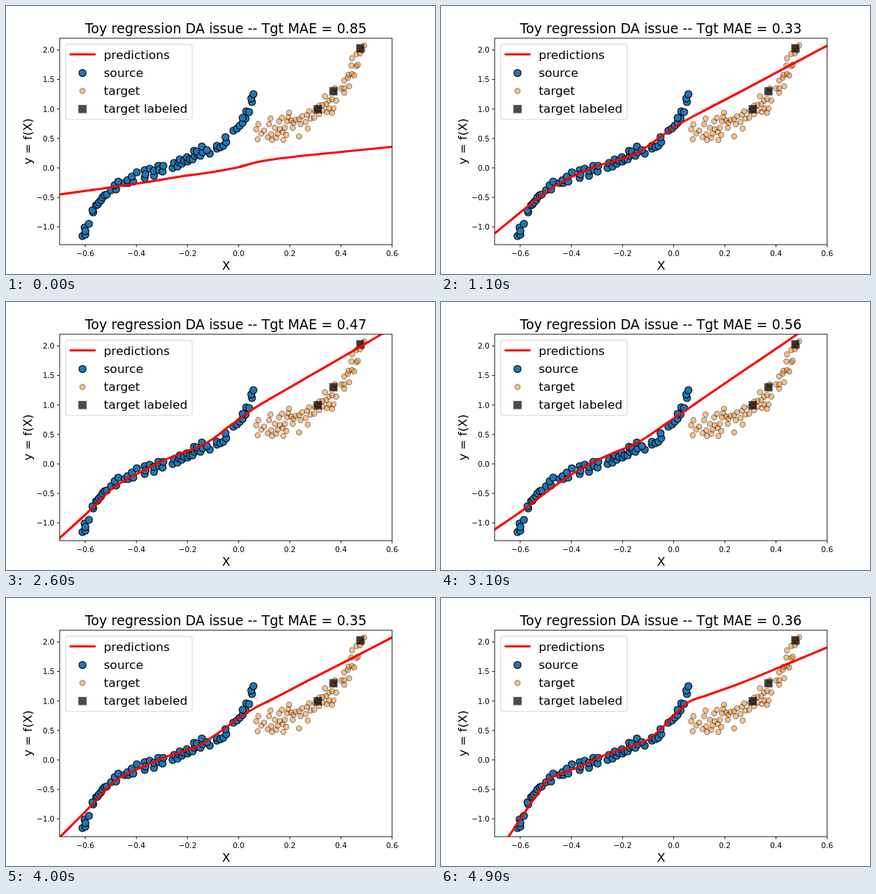
Recreate the animation shown at these times as an HTML page. Size 600x374 px, loop 5 s.

```html
<!DOCTYPE html>
<html lang="en">
<head>
<meta charset="utf-8">
<title>Toy regression</title>
<style>
html, body { margin: 0; width: 100%; height: 100%; overflow: hidden; background: #fff; }
svg { display: block; width: 600px; height: 374px; font-family: "DejaVu Sans", sans-serif; }
text { text-anchor: middle; }
.big { font-size: 16.67px; }
.tick { font-size: 10.42px; }
.legend { text-anchor: start; }
.axis { fill: none; stroke: #000; stroke-width: .9; }
.source { fill: #1f77b4; stroke: #000; stroke-width: 1.1; }
.target { fill: #ff7f0e; stroke: #000; stroke-width: 1.04; opacity: .5; }
.labeled { stroke: #000; opacity: .7; }
.fit { fill: none; stroke: #f00; stroke-width: 3.13; stroke-linecap: square; stroke-linejoin: round; }
</style>
</head>
<body>
<svg id="plot" viewBox="0 0 600 374">
  <clipPath id="area"><rect x="75" y="45" width="465" height="288"/></clipPath>
</svg>
<script>
const svg = document.getElementById('plot');

function add(tag, attrs, text) {
  const el = document.createElementNS('http://www.w3.org/2000/svg', tag);
  for (const k in attrs) el.setAttribute(k, attrs[k]);
  if (text) el.textContent = text;
  return svg.appendChild(el);
}
const label = (x, y, cls, text, more) => add('text', { x, y, class: cls, ...more }, text);
const dot = (cx, cy, cls) => add('circle', { cx, cy, r: cls === 'source' ? 5 : 3.65, class: cls });
const square = (x, y) => add('rect', { x: x - 5.2, y: y - 5.2, width: 10.4, height: 10.4, class: 'labeled' });
const number = v => v.toFixed(1).replace('-', '\u2212');

function scatter(list, cls) {
  for (let i = 0; i < list.length; i += 2) dot(list[i], list[i + 1], cls);
}

const source = [
  107,321, 111,319, 110,309, 111,314, 116,304, 122,288, 121,285, 126,278, 128,277,
  130,274, 133,271, 135,267, 138,264, 141,263, 147,257, 154,256, 152,250, 157,245,
  166,247, 171,247, 170,243, 178,245, 176,238, 183,232, 194,240, 194,229, 195,235,
  201,227, 207,237, 207,230, 213,223, 214,229, 219,231, 220,223, 233,226, 235,219,
  240,224, 242,218, 246,220, 243,214, 249,216, 254,217, 253,211, 257,214, 261,214,
  264,209, 263,202, 268,207, 267,203, 272,209, 275,204, 274,196, 285,206, 281,201,
  295,199, 295,195, 300,197, 304,195, 308,190, 307,183, 318,174, 323,171, 327,167,
  331,163, 335,157, 331,156, 336,147, 340,148, 344,134, 343,129, 346,123
];
const target = [
  352,186, 353,165, 350,172, 357,178, 361,174, 366,183, 368,165, 370,157, 371,179,
  372,187, 376,170, 378,184, 380,178, 382,161, 383,172, 386,156, 387,176, 388,187,
  390,170, 393,161, 392,180, 396,149, 395,155, 399,160, 401,170, 402,163, 405,159,
  410,158, 410,182, 412,165, 414,154, 419,162, 421,152, 422,171, 424,147, 426,157,
  431,156, 432,147, 436,144, 438,151, 438,139, 443,146, 443,138, 446,126, 448,137,
  449,148, 452,143, 452,132, 456,130, 458,143, 456,149, 458,120, 462,132, 460,115,
  469,115, 473,121, 473,104, 473,115, 478,100, 480,112, 479,96, 484,95, 483,83,
  484,73, 487,97, 490,84, 492,82, 490,67, 495,66, 495,59, 498,62, 501,55
];

scatter(source, 'source');
scatter(target, 'target');
[[436, 144], [458, 119], [495.5, 59]].forEach(p => square(...p));

const fit = add('path', { class: 'fit', 'clip-path': 'url(#area)' });

// Axes
add('rect', { x: 75, y: 45, width: 465, height: 288, class: 'axis' });
for (let i = 0; i < 7; i++) {
  const x = 110.8 + i * 71.54;
  add('path', { d: `M${x} 333v3.6`, class: 'axis' });
  label(x, 348.6, 'tick', number((i - 3) / 5));
  const y = 308.2 - i * 41.13;
  add('path', { d: `M75 ${y}h-3.6`, class: 'axis' });
  label(68, y + 3.9, 'tick', number(i / 2 - 1), { style: 'text-anchor:end' });
}
label(308, 368, 'big', 'X');
label(0, 0, 'big', 'y = f(X)', { transform: 'translate(35.5 189) rotate(-90)' });
const title = label(307.5, 38.3, '', '', { 'font-size': 18.75 });

// Legend
add('rect', { x: 83.3, y: 53.3, width: 177, height: 105, rx: 3.3, fill: '#fff', stroke: '#ccc', 'stroke-width': 1.04, opacity: .8 });
add('path', { d: 'M90.5 67.5H123.8', class: 'fit' });
dot(107, 93.5, 'source');
dot(107, 118.5, 'target');
square(107, 143.8);
['predictions', 'source', 'target', 'target labeled'].forEach((s, i) =>
  label(136.7, 73.5 + i * 25.1, 'big legend', s));

// Fitted curve heights at xs, keyed by training step (0 to 49)
const xs = [75, 111, 130, 150, 170, 195, 220, 250, 270, 290, 310, 325, 347, 370, 420, 480, 540];
const keys = [
  { step: 0, mae: .85, ys: [263, 258, 255.5, 252.5, 249.5, 246, 242, 237, 234.5, 231.5, 228, 225, 219, 214.5, 208.5, 202.5, 196.5] },
  { step: 4, mae: .18, ys: [299.5, 281, 271, 261, 250, 237, 226, 214, 208.5, 203, 195, 188.5, 177, 164.5, 137.5, 104, 68.5] },
  { step: 11, mae: .33, ys: [317.5, 288, 273, 257.5, 245, 233, 223, 214, 207, 195, 180.5, 170, 157, 145, 119, 87, 55.5] },
  { step: 19, mae: .35, ys: [346, 302, 277.5, 253, 244, 235, 223, 212, 206, 196, 178, 166, 149, 138.5, 117, 91, 64.5] },
  { step: 31, mae: .56, ys: [317.5, 293, 278.5, 263.5, 249, 233, 220, 207, 199, 187, 173, 163, 148, 132, 98, 57.5, 16] },
  { step: 40, mae: .35, ys: [334, 298, 278, 257, 245, 234, 223, 213, 206, 193, 179, 168, 154, 142.5, 116.5, 86, 55] },
  { step: 49, mae: .36, ys: [362, 308.5, 280, 254, 244, 235, 223, 212, 205.5, 197.5, 180.5, 165, 145, 136.5, 118.5, 94, 69] }
];

function curve(ys) {
  const last = xs.length - 1;
  const slope = i => {
    const a = Math.max(i - 1, 0), b = Math.min(i + 1, last);
    return (ys[b] - ys[a]) / (xs[b] - xs[a]);
  };
  let d = `M${xs[0]} ${ys[0]}`;
  for (let i = 0; i < last; i++) {
    const h = (xs[i + 1] - xs[i]) / 3;
    d += `C${xs[i] + h} ${ys[i] + h * slope(i)} ${xs[i + 1] - h} ${ys[i + 1] - h * slope(i + 1)} ${xs[i + 1]} ${ys[i + 1]}`;
  }
  return d;
}

let shown = -1;
function draw(now) {
  const step = Math.floor(now % 5000 / 100);
  if (step !== shown) {
    shown = step;
    const n = Math.max(1, keys.findIndex(k => k.step >= step));
    const a = keys[n - 1], b = keys[n];
    const u = (step - a.step) / (b.step - a.step);
    const mix = (p, q) => p + (q - p) * u;
    fit.setAttribute('d', curve(a.ys.map((y, i) => mix(y, b.ys[i]))));
    title.textContent = `Toy regression DA issue -- Tgt MAE = ${mix(a.mae, b.mae).toFixed(2)}`;
  }
}
const start = performance.now();
function tick() {
  draw(performance.now() - start);
  requestAnimationFrame(tick);
}
tick();
</script>
</body>
</html>
```
